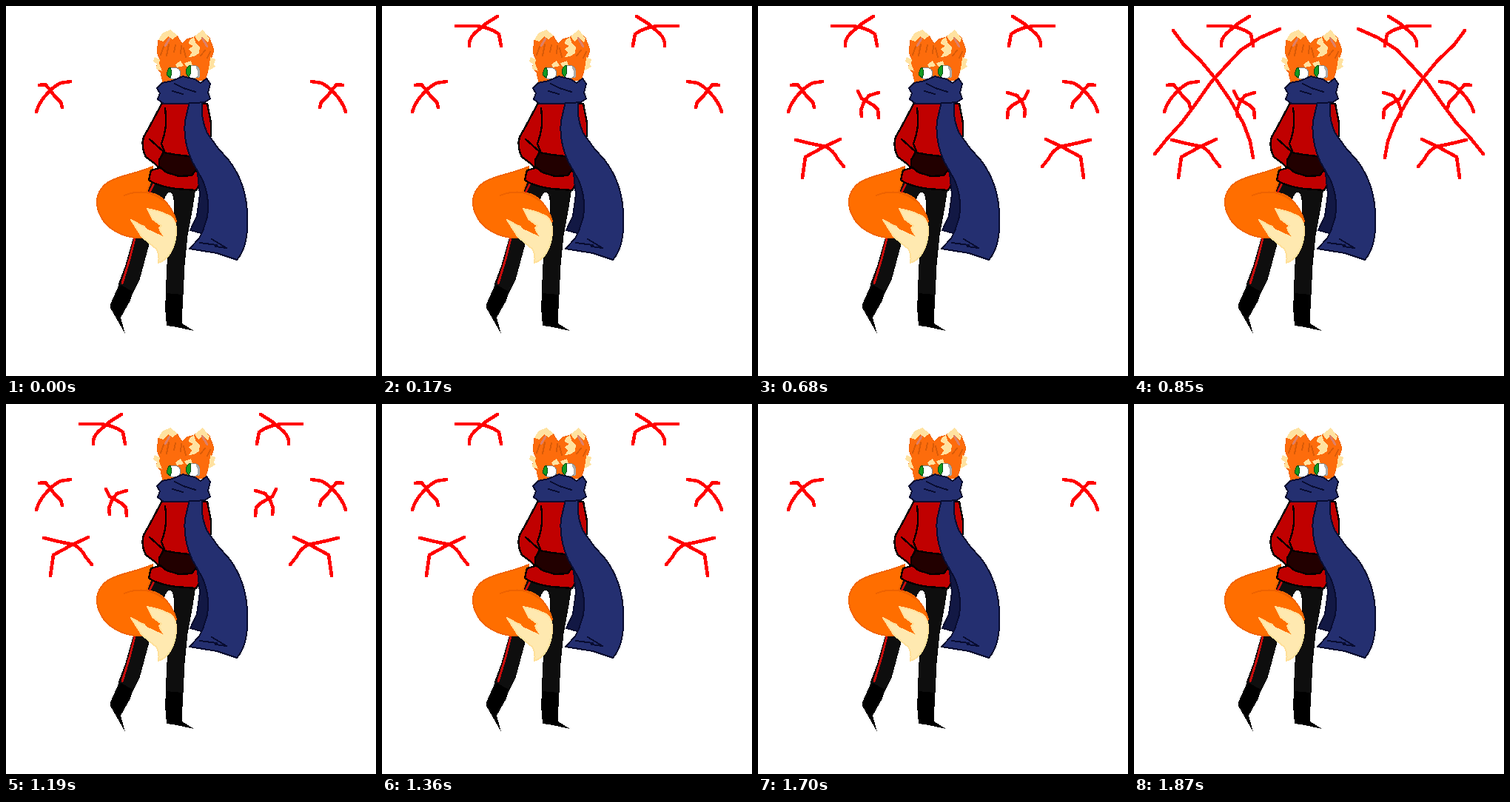
Write an HTML page that moves like this. It is 500 px wide and 500 px high and loops after 2.38 s.

```html
<!DOCTYPE html>
<html lang="en">
<head>
<meta charset="utf-8">
<title>Fox with red marks</title>
<style>
  html, body { margin: 0; width: 100%; height: 100%; overflow: hidden; background: #fff; }
  svg { display: block; width: 100vw; height: 100vh; shape-rendering: crispEdges; }
  path { stroke-linejoin: round; stroke-linecap: round; }
  .line { fill: none; }
  .marks { fill: none; stroke: #f00; stroke-width: 4.6; }

  /* The loop has 14 beats of 170 ms. */
  .side, .top, .low, .inner, .big { animation: 2380ms step-end infinite; }
  .side { animation-name: side; }
  .top { animation-name: top; }
  .low { animation-name: low; }
  .inner { animation-name: inner; }
  .big { animation-name: big; }
  @keyframes side { 0% { visibility: visible } 78.57%, 100% { visibility: hidden } }
  @keyframes top { 0%, 100% { visibility: hidden } 7.14% { visibility: visible } 71.42% { visibility: hidden } }
  @keyframes low { 0%, 100% { visibility: hidden } 21.42% { visibility: visible } 64.28% { visibility: hidden } }
  @keyframes inner { 0%, 100% { visibility: hidden } 28.57% { visibility: visible } 57.14% { visibility: hidden } }
  @keyframes big { 0%, 100% { visibility: hidden } 35.71% { visibility: visible } 50% { visibility: hidden } }
</style>
</head>
<body>
<svg viewBox="0 0 500 500">
  <g id="legs">
    <path fill="#0e0e0e" stroke="#000" d="M193 238L256 246 252 272 245 310 241 350 239 390 216 390 218 350 219 318 227 288 227 262Q226 251 221 251 216 253 213 262L204 300 193 322 180 370 171 388 152 377 162 350 172 315 187 262Z"/>
    <path fill="#000" d="M153 376L172 386 168 398 155 421 161 443 141 408 141 403ZM216 388L239 390 238 429 254 439 231 434 217 432 215 408Z"/>
    <path class="line" stroke="#c80c0c" stroke-width="3" d="M200 240L194 252M174 314L167 342 157 375"/>
  </g>

  <g id="tail">
    <path fill="#ff6e00" stroke="#f26400" stroke-width="2" d="M198 217C176 227 151 229 137 239 124 248 121 262 124 274 129 292 143 304 160 310Q172 314 184 313L222 300 230 291C226 275 214 259 201 254L190 252 196 236Z"/>
    <path fill="#ffe9b0" stroke="#ffe09a" stroke-width="2" d="M191 274L208 278 222 284Q231 291 230 306C229 326 220 343 206 347Q208 336 203 328 193 321 183 311L169 289 182 296 194 301 212 311 207 300 210 297 198 288Z"/>
    <path fill="#ff6e00" d="M181 288L193 292 203 297 212 311 199 305 190 301Z"/>
    <path class="line" stroke="#ee6200" stroke-width="2" d="M160 256Q174 250 190 252 202 255 213 263"/>
  </g>

  <g id="jacket" stroke="#000" stroke-width="2.4">
    <path fill="#c00000" d="M211 131L203 146 195 161 186 177Q182 190 189 204L201 213 207 219 196 222 193 235Q203 243 230 247L257 249 262 240 258 222 262 185 277 176 277 158 272 132Z"/>
    <path class="line" d="M215 138Q219 164 210 186L214 196M194 180L203 188 213 197 207 208"/>
    <path fill="#220000" d="M213 198L230 201 247 203 257 209 258 220 251 229 234 230 217 225 207 217 207 208Z"/>
  </g>

  <g id="head">
    <path fill="#fd6c0c" stroke="#f06408" d="M208 73L204 62 206 46 221 34 231 40 238 51 244 45 254 42 266 34 275 43 281 60 277 72 280 80 273 87 269 101 239 100 212 104 209 90 203 82Z"/>
    <g fill="#ffe2a0">
      <path d="M206 46L211 37 222 32 232 40 225 45 219 41 212 48ZM255 41L266 32 275 44 273 49 266 43 260 48ZM248 46L254 42 257 51 262 55 261 64 254 68 247 69 251 63 247 58 253 54 247 51ZM201 69L208 72 207 78 211 88 203 85 204 78 199 75ZM276 69L283 72 281 79 283 82 273 88 275 79ZM229 79L236 74 240 81 231 83ZM241 77L250 74 252 81 244 82Z"/>
    </g>
    <path class="line" stroke="#dd8068" stroke-width="3" d="M215 54L221 44M265 43L272 55"/>
    <path class="line" stroke="#d95b08" stroke-width="2" d="M209 66L213 55M217 67L220 52M227 62L229 53M236 64L237 54M263 67L269 60M272 70L276 62M240 57L243 69"/>
    <g stroke-width="1">
      <ellipse cx="227" cy="91" rx="9" ry="8" fill="#fff" stroke="#888"/>
      <ellipse cx="253" cy="89" rx="9" ry="9" fill="#fff" stroke="#888"/>
      <path fill="#129a22" stroke="#064d10" d="M222 83Q217 85 218 94L222 97Q225 90 222 83ZM249 80Q243 82 243 91L247 96Q252 88 249 80Z"/>
      <path class="line" stroke="#aaa" stroke-width="3" d="M258 83Q262 88 260 96"/>
    </g>
  </g>

  <g id="scarf" stroke="#080c30" stroke-width="2">
    <path fill="#121844" d="M259 226L262 255 258 284 249 303 264 307 272 298 274 258 267 233Z"/>
    <path fill="#242f70" d="M248 130L242 155Q239 183 252 211L265 234Q276 258 272 285L266 304 261 314 248 328 285 334 312 343Q328 325 326 285 326 240 300 207L288 194 272 172Q263 153 265 130Z"/>
    <path fill="#242f70" d="M211 104L225 101 239 95 255 99 263 104 271 98 276 105 273 117 276 125 269 130 240 132 213 132 205 126 208 118 204 111Z"/>
    <path class="line" d="M228 105L240 111 256 116M225 115L239 119M262 320L285 323M278 315L298 327 283 325"/>
  </g>

  <g class="marks">
    <g id="half">
      <path class="side" d="M87 102L74 104Q64 109 57 117 45 129 41 143M45 107L53 106Q60 113 65 121L74 130 76 137"/>
      <path class="top" d="M100 27L128 27Q146 29 158 38L161 54M156 14L140 24 125 37Q117 45 118 54"/>
      <path class="low" d="M51 181L72 186 91 190Q102 195 107 206L116 217M111 180L88 191 64 204 60 232"/>
      <path class="inner" d="M135 115L140 125 156 134 162 140 163 151M163 117L150 121 143 130 139 141 140 149"/>
      <path class="big" d="M53 33L67 52 90 74 110 98 130 127 148 159 157 183 161 205M197 31L170 43 145 59 125 80 104 103 85 130 65 157 45 179 28 200"/>
    </g>
  </g>
</svg>
<script>
  // Mirror the marks as real elements so both sides share one timeline.
  const half = document.getElementById('half');
  const mirror = half.cloneNode(true);
  mirror.id = 'mirror';
  mirror.setAttribute('transform', 'matrix(-1 0 0 1 500 0)');
  half.after(mirror);
</script>
</body>
</html>
```
